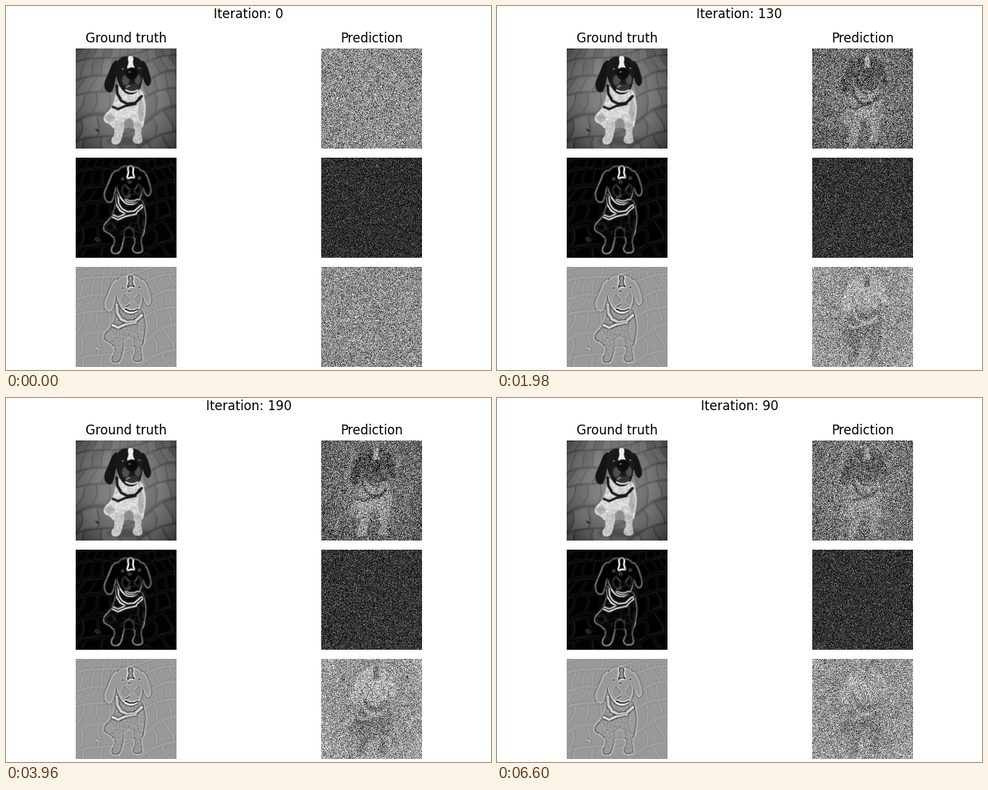
Animation of 640 by 480 pixels, one loop 6.93 s. Source, as a matplotlib script:

```python
import numpy as np
import matplotlib.pyplot as plt
from matplotlib.animation import FuncAnimation
from matplotlib.path import Path

WIDTH, HEIGHT, DPI = 640, 480, 100
COLS, ROWS = 133, 132          # size of one panel in pixels
SCALE = 2                      # supersampling of the drawing

X, Y = np.meshgrid((np.arange(COLS * SCALE) + 0.5) / SCALE,
                   (np.arange(ROWS * SCALE) + 0.5) / SCALE)


def blur(a, passes):
    for _ in range(passes):
        p = np.pad(a, 1, mode="edge")
        p = (p[:-2] + 2 * p[1:-1] + p[2:]) / 4
        a = (p[:, :-2] + 2 * p[:, 1:-1] + p[:, 2:]) / 4
    return a


def shrink(a):
    return a.reshape(ROWS, SCALE, COLS, SCALE).mean(axis=(1, 3))


def blob(*points):
    """Mask of a closed shape with rounded corners."""
    p = np.array(points, float)
    for _ in range(3):
        q = np.roll(p, -1, axis=0)
        p = np.stack([0.75 * p + 0.25 * q, 0.25 * p + 0.75 * q], 1).reshape(-1, 2)
    grid = np.column_stack([X.ravel(), Y.ravel()])
    return Path(p).contains_points(grid).reshape(X.shape).astype(float)


def oval(cx, cy, rx, ry):
    return (((X - cx) / rx) ** 2 + ((Y - cy) / ry) ** 2 < 1).astype(float)


def stroke(width, *points):
    dist = np.full(X.shape, 1e3)
    for (x0, y0), (x1, y1) in zip(points, points[1:]):
        dx, dy = x1 - x0, y1 - y0
        t = np.clip(((X - x0) * dx + (Y - y0) * dy) / (dx * dx + dy * dy), 0, 1)
        dist = np.minimum(dist, np.hypot(X - x0 - t * dx, Y - y0 - t * dy))
    return np.clip(width / 2 - dist + 0.5, 0, 1)


def pavement():
    """Uneven stones with darker joints and a vignette."""
    tone = 0.53 - 0.25 * (((X - 66) / 80) ** 2 + ((Y - 58) / 95) ** 2)
    depth = 9 * np.sqrt((Y + 25) / 157)
    v = depth + 0.012 * X + 0.2 * np.sin(X / 17 + 1) + 0.1 * np.sin(Y / 9)
    row = np.floor(v)
    u = (X - 66) / (10 + 0.11 * Y) + 0.47 * row + 0.15 * np.sin(Y / 7 + row)
    col = np.floor(u)
    joint = np.maximum(np.exp(-((v - np.round(v)) / 0.07) ** 2),
                       np.exp(-((u - np.round(u)) / 0.05) ** 2))
    stone = 0.025 * np.sin(row * 5.3 + col * 3.7)
    return np.clip(tone + stone - 0.1 * joint, 0.12, 1)


def draw_dog():
    img = pavement()
    rng = np.random.default_rng(4)
    mottle = blur(rng.normal(size=X.shape), 5)

    def paint(mask, tone):
        nonlocal img
        img = img + mask * (tone - img)

    paint(blur(oval(70, 122, 30, 6), 30) * 0.5, 0.2)
    paint(blob((54, 50), (52, 66), (46, 80), (38, 87), (36, 96), (45, 100),
               (50, 106), (60, 106), (72, 104), (80, 107), (89, 105), (91, 92),
               (93, 80), (91, 66), (87, 53), (74, 60), (62, 54)),
          0.84 + 0.25 * mottle)
    paint(blur(oval(70, 102, 7, 10), 8) * 0.7, 0.42)
    paint(blur(oval(45, 92, 6, 5), 8) * 0.5, 0.5)
    paint(blur(oval(86, 82, 4, 14), 8) * 0.45, 0.5)
    paint(blob((49, 97), (52, 112), (46, 121), (49, 127), (58, 126), (61, 118),
               (64, 104), (63, 96)), 0.78 + 0.2 * mottle)
    paint(blob((76, 97), (79, 112), (74, 120), (78, 126), (88, 125), (88, 118),
               (86, 110), (89, 97)), 0.75 + 0.2 * mottle)

    paint(blob((56, 15), (49, 19), (43, 34), (37, 47), (39, 57), (47, 60),
               (51, 50), (54, 34)), 0.08)
    paint(blob((86, 15), (93, 21), (98, 36), (100, 46), (95, 52), (90, 45),
               (87, 32)), 0.08)
    paint(blob((72, 11), (60, 12), (53, 20), (52, 34), (56, 46), (62, 58),
               (73, 63), (84, 57), (88, 44), (90, 24), (84, 13)), 0.1)
    paint(blob((68, 11), (77, 11), (75, 21), (79, 28), (72, 30), (67, 27),
               (70, 20)), 0.93)
    paint(blur(oval(66, 43, 5, 7) + oval(82, 42, 4, 7), 4) * 0.8, 0.36)
    paint(oval(74, 34, 8, 8), 0.05)
    paint(oval(71, 32, 2, 1), 0.35)
    paint(oval(62, 28, 1.5, 1), 0.45)
    paint(oval(84, 27, 1.5, 1), 0.45)
    paint(blob((64, 51), (74, 47), (84, 50), (82, 58), (74, 61), (66, 58)), 0.2)
    paint(stroke(1.8, (66, 56), (71, 58), (77, 58), (82, 56)), 0.95)
    paint(stroke(1.2, (67, 52), (71, 50)), 0.7)

    paint(stroke(3.4, (54, 50), (55, 61), (60, 69), (68, 73), (78, 72), (87, 64)), 0.1)
    paint(stroke(3, (49, 77), (56, 80), (65, 76), (79, 73)), 0.1)
    paint(stroke(1.2, (53, 77), (60, 76)), 0.7)
    paint(stroke(2.5, (27, 107), (30, 109)), 0.18)
    return np.clip(blur(img, 1), 0, 1)


def edges(img):
    gy, gx = np.gradient(blur(img, 5))
    mag = np.hypot(gx, gy)
    return np.clip(0.85 * mag / np.percentile(mag, 99.3), 0, 1) ** 1.15


def laplacian(img):
    p = np.pad(blur(img, 3), 1, mode="edge")
    lap = p[:-2, 1:-1] + p[2:, 1:-1] + p[1:-1, :-2] + p[1:-1, 2:] - 4 * p[1:-1, 1:-1]
    return np.clip(0.6 + 0.22 * lap / np.percentile(abs(lap), 98), 0, 1)


dog = draw_dog()
truths = [shrink(a) for a in (dog, edges(dog), laplacian(dog))]
form = shrink(blur(dog, 4)) - 0.45

# Steps run in alphabetical order, after a doubled start.
steps = [0] + sorted(range(0, 200, 10), key=str)


def predict(step):
    """Noisy fits of picture, gradient and Laplacian at one training step."""
    rng = np.random.default_rng(100 + step)
    fit = (0.6 + 0.002 * step) / (1 + np.exp((62 - step) / 14))
    noise = rng.normal(size=(2, ROWS, COLS))
    picture = 0.55 - 0.11 * fit + 0.42 * fit * form + 0.17 * noise[0]
    gradient = rng.rayleigh(0.15 + 0.02 * fit, (ROWS, COLS))
    second = 0.55 + 0.03 * fit - 0.3 * fit * form + 0.16 * noise[1]
    return [np.clip(a, 0, 1) for a in (picture, gradient, second)]


def add_panel(left, top, data, title=None):
    ax = fig.add_axes([left / WIDTH, 1 - (top + ROWS) / HEIGHT,
                       COLS / WIDTH, ROWS / HEIGHT])
    ax.axis("off")
    if title:
        ax.set_title(title, fontsize=12)
    return ax.imshow(data, cmap="gray", vmin=0, vmax=1, aspect="auto",
                     interpolation="nearest")


plt.rcParams["font.family"] = "DejaVu Sans"
fig = plt.figure(figsize=(WIDTH / DPI, HEIGHT / DPI), dpi=DPI, facecolor="white")
heading = fig.text(0.5, 464 / HEIGHT, "", fontsize=12, ha="center", va="baseline")

panels = []
for i, (truth, guess) in enumerate(zip(truths, predict(0))):
    top = 56 + 144 * i
    add_panel(92, top, truth, None if i else "Ground truth")
    panels.append(add_panel(416, top, guess, None if i else "Prediction"))


def update(frame):
    step = steps[frame]
    heading.set_text(f"Iteration: {step}")
    for panel, data in zip(panels, predict(step)):
        panel.set_data(data)
    return [heading, *panels]


anim = FuncAnimation(fig, update, frames=len(steps), interval=330, repeat=True)
plt.show()
```
